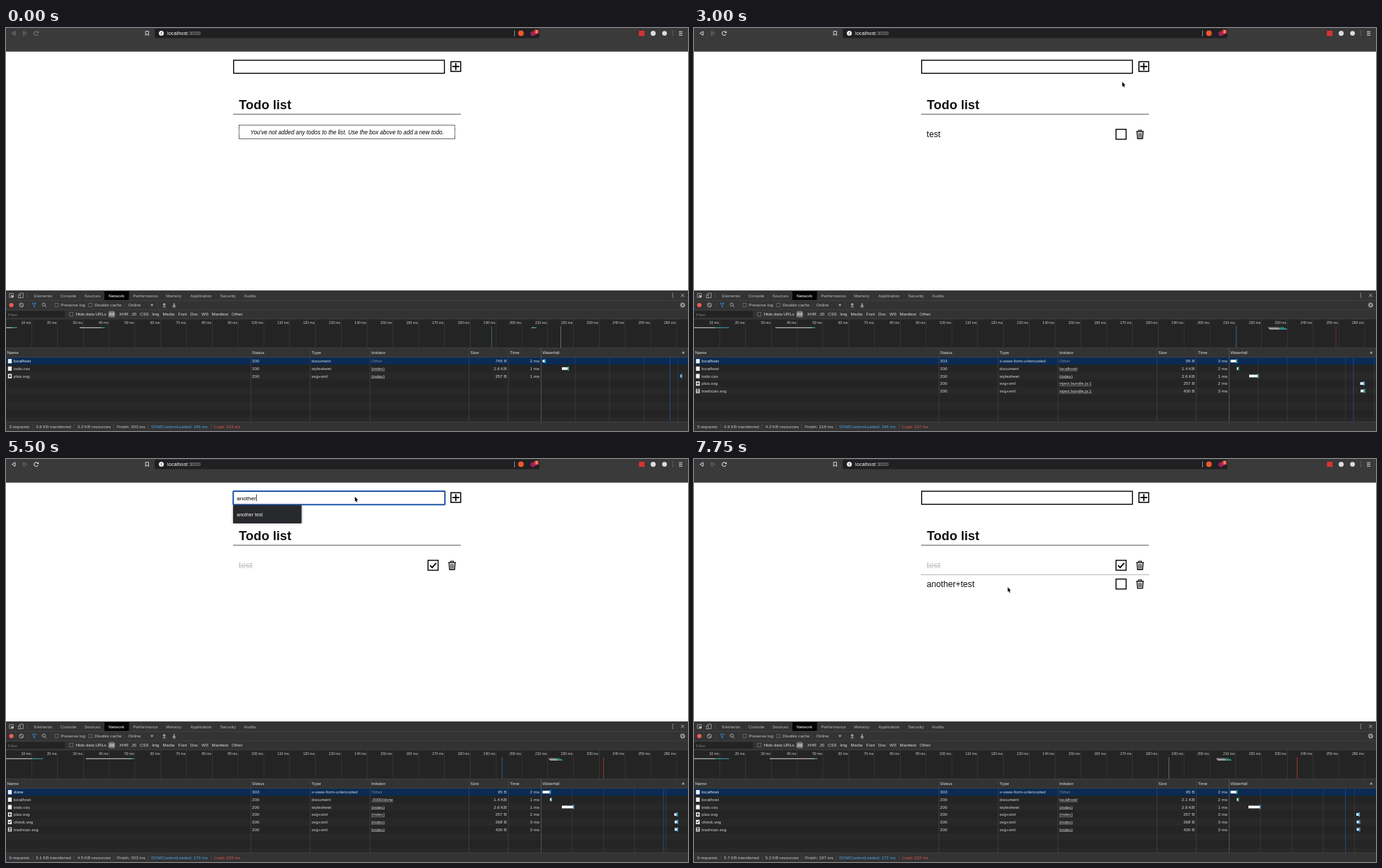
Recreate the animation shown at these times as an HTML page with a canvas. Size 973 px wide and 576 px high, loop 8 s.

```html
<!DOCTYPE html>
<html lang="en">
<head>
<meta charset="utf-8">
<title>Todo list</title>
<style>
html, body { margin: 0; width: 100%; height: 100%; overflow: hidden; background: #fff; }
canvas { display: block; width: 973px; height: 576px; }
</style>
</head>
<body>
<canvas id="stage"></canvas>
<script>
const W = 973, H = 576, LOOP = 8000;
const canvas = document.getElementById('stage');
const dpr = window.devicePixelRatio || 1;
canvas.width = W * dpr;
canvas.height = H * dpr;
const c = canvas.getContext('2d');
const GREEN = '#2fb58c', BLUE = '#38a3e0', INK = '#d6d6d6', DIM = '#8a8a8a';

// ---- drawing helpers; text is placed by the middle of its capitals ----
function text(s, x, y, color = INK, size = 6.2, style = '', align = 'left') {
  c.font = `${style} ${size}px "Liberation Sans", Arial, sans-serif`;
  c.textAlign = align;
  c.fillStyle = color;
  c.fillText(s, x, y + size * 0.36);
  return c.measureText(s).width;
}
function rect(x, y, w, h, color) { c.fillStyle = color; c.fillRect(x, y, w, h); }
function box(x, y, w, h, color, lw = 1) {
  c.strokeStyle = color; c.lineWidth = lw;
  c.strokeRect(x + lw / 2, y + lw / 2, w - lw, h - lw);
}
function round(x, y, w, h, r, color) {
  c.fillStyle = color; c.beginPath(); c.roundRect(x, y, w, h, r); c.fill();
}
function dot(x, y, r, color) {
  c.fillStyle = color; c.beginPath(); c.arc(x, y, r, 0, 7); c.fill();
}
function ring(x, y, r, color, from = 0, to = 6.3) {
  c.strokeStyle = color; c.beginPath(); c.arc(x, y, r, from, to); c.stroke();
}
function path(points, color, lw, fill) {
  c.beginPath();
  for (let i = 0; i < points.length; i += 2) c.lineTo(points[i], points[i + 1]);
  if (fill) { c.closePath(); c.fillStyle = fill; c.fill(); }
  if (color) { c.strokeStyle = color; c.lineWidth = lw || 1; c.stroke(); }
}
const vline = (x, y, h, color) => rect(x, y, 0.8, h, color);

// ---- network panel data ----
const row = (cells, start, mid, end, cap) => ({ cells: cells.split('|'), start, mid, end, cap });
const form = (name, ms, mid, cap = GREEN) =>
  row(`${name}|303|x-www-form-urlencoded|Other|95 B|${ms} ms`, 765.5, mid, mid + 1.8, cap);
const page = (from, size, ms, x, cap = GREEN) =>
  row(`localhost|200|document|${from}|${size} KB|${ms} ms`, x, x + 1.8, x + 3, cap);
const sheet = (x, mid, cap = GREEN) =>
  row('todo.css|200|stylesheet|(index)|2.6 KB|1 ms', x, mid, mid + 1.6, cap);
const image = (name, from, size, ms, x, mid, cap = BLUE) =>
  row(`${name}.svg|200|svg+xml|${from}|${size} B|${ms} ms`, x, mid, mid + 2, cap);
const waiting = name => row(`${name}.svg|(pending)||(index)|0 B|Pending`);

function pending(name, from, size, icons) {
  return {
    step: 44.9, ms: 5, grid: 51.9, load: 953,
    bars: [[0, 38, 48, 62], [136, 216, 220, 220]],
    marks: [[847, '#2f6fae']],
    stat: [`${icons.length + 3} requests`, '4.8 KB transferred', '4.5 KB resources', 'Finish: 36 ms', 'DOMContentLoaded: 172 ms'],
    rows: [form(name, 2, 775), page(from, size, 2, 776.5), sheet(795.5, 813.5, BLUE), ...icons.map(waiting)]
  };
}
function loaded(grid, load, bars, marks, stat, rows, burst) {
  return { step: 36.8, ms: 10, grid, load, bars, marks, stat, rows, burst };
}
const stats = (n, sent, res, fin, dom, load) =>
  [`${n} requests`, `${sent} KB transferred`, `${res} KB resources`, `Finish: ${fin} ms`,
   `DOMContentLoaded: ${dom} ms`, `Load: ${load} ms`];
const bundle = 'inject.bundle.js:1';

const nets = {
  empty: loaded(48.9, 947, [[0, 9, 14, 16], [105, 136, 141, 141], [750, 753, 757, 757]],
    [[692.5, '#4d7896'], [791, '#777']], stats(3, '3.6', '3.3', 203, 186, 213), [
      row('localhost|200|document|Other|745 B|2 ms', 765.5, 768.5, 770, BLUE),
      sheet(793, 801.5), image('plus', '(index)', 257, 1, 962, 962.8)]),
  adding: pending('localhost', 'localhost/', '1.4', ['plus', 'trashcan']),
  one: loaded(41.5, 940.5, [[0, 30, 38, 50], [116, 169, 173, 173]],
    [[773.5, '#2f6fae'], [915.5, '#8e2f2a']], stats(5, '4.8', '4.3', 218, 198, 237), [
      form('localhost', 3, 773.5), page('localhost/', '1.4', 2, 774.5), sheet(792, 804),
      image('plus', bundle, 257, 2, 950.5, 955), image('trashcan', bundle, 430, 3, 951, 955.5, GREEN)],
    [819, 846]),
  ticking: pending('done', ':3000/done', '1.4', ['plus', 'check', 'trashcan']),
  done: loaded(44.5, 937.5, [[0, 37, 45, 53], [114, 179, 183, 183]],
    [[707.5, '#2f6fae'], [852, '#b23a32']], stats(6, '5.1', '4.5', 203, 179, 219), [
      form('done', 2, 775.5, BLUE), page(':3000/done', '1.4', 1, 776, BLUE), sheet(793, 809, BLUE),
      image('plus', '(index)', 257, 2, 953.5, 956.5), image('check', '(index)', 268, 3, 954, 957),
      image('trashcan', '(index)', 430, 3, 954, 957)], [774, 794]),
  again: pending('localhost', 'localhost/', '2.1', ['plus', 'check', 'trashcan']),
  two: loaded(44.8, 929, [[0, 30, 39, 50], [108, 172, 176, 176]],
    [[677, '#777'], [860, '#b23a32']], stats(6, '5.7', '5.2', 197, 172, 222), [
      form('localhost', 2, 773.5), page('localhost/', '2.1', 2, 774.5), sheet(791, 807, BLUE),
      image('plus', '(index)', 257, 3, 945, 948), image('check', '(index)', 268, 3, 945.5, 948.5),
      image('trashcan', '(index)', 430, 3, 945.5, 948.5)], [745, 767])
};

// ---- what changes, and when ----
const test = { name: 'test' }, testDone = { name: 'test', done: true };
const all = ['test', 'another test'], last = ['another test'];
const idle = { focus: false, value: '', auto: false, menu: [], pick: -1, busy: false };
const steps = [
  [0, { ...idle, active: false, net: 'empty', todos: [], mouse: null }],
  [250, { active: true, mouse: [590, 170] }],
  [500, { mouse: [556, 84] }],
  [750, { mouse: [544.5, 54] }],
  [1250, { focus: true, menu: all }],
  [1750, { value: 'test', auto: true, pick: 0 }],
  [2000, { menu: [], pick: -1 }],
  [2250, { busy: true, net: 'adding' }],
  [2500, { ...idle, net: 'one', todos: [test] }],
  [2750, { mouse: [560, 59] }],
  [3000, { mouse: [611, 77] }],
  [3250, { mouse: [608, 149] }],
  [3500, { busy: true, net: 'ticking' }],
  [3750, { busy: false, net: 'done', todos: [testDone] }],
  [4000, { mouse: [570, 112] }],
  [4250, { mouse: [494.5, 54.5] }],
  [4500, { mouse: [497.8, 54] }],
  [5000, { focus: true, menu: all }],
  [5250, { value: 'ano', menu: last }],
  [5500, { value: 'another' }],
  [5750, { value: 'another test', auto: true, pick: 0 }],
  [6250, { menu: [], pick: -1 }],
  [6750, { busy: true, net: 'again' }],
  [7250, { ...idle, net: 'two', todos: [testDone, { name: 'another+test' }] }],
  [7500, { mouse: [478, 112] }],
  [7750, { mouse: [447.6, 183.2] }]
];

// ---- browser bar ----
function drawBrowser(s) {
  rect(0, 0, W, 33.6, '#3a3a3b');
  const on = s.active ? '#f0f0f0' : '#858585';
  path([13, 4.8, 8.6, 7.6, 13, 10.4, 13, 4.8], on, 0.9);
  path([25, 4.8, 29.4, 7.6, 25, 10.4, 25, 4.8], '#858585', 0.8);
  c.lineWidth = 1;
  if (s.busy) {
    path([40.2, 4.8, 45.8, 10.4], on, 1.1);
    path([45.8, 4.8, 40.2, 10.4], on, 1.1);
  } else {
    ring(43, 7.7, 2.9, on, 0.3, 5.4);
    path([46.5, 4.2, 46.5, 7, 43.7, 7], null, 0, on);
  }
  path([199.2, 4.6, 203.4, 4.6, 203.4, 10.6, 201.3, 8.8, 199.2, 10.6, 199.2, 4.6], '#e8e8e8', 0.9);
  round(212, 0.8, 549, 13.6, 2, '#202022');
  dot(221.6, 7.6, 3.5, '#f2f2f2');
  text('!', 221.6, 7.7, '#202022', 5.8, 'bold', 'center');
  const w = text('localhost', 230, 7.6, '#f5f5f5', 7.4);
  text(':3000', 230 + w, 7.6, '#a5a5a6', 7.4);
  vline(725, 3.5, 8.5, '#aaa');
  dot(734.7, 7.6, 4, '#f0562b');
  dot(751.8, 8, 3.6, '#9e1f63');
  round(753.6, 2.2, 6.4, 6.4, 2, '#e0432f');
  text('3', 756.8, 5.5, '#fff', 5, '', 'center');
  rect(903, 4, 8, 7.2, '#d8322f');
  dot(923.3, 7.6, 3.6, '#dcdcdc');
  dot(939.5, 7.6, 3.4, '#dcdcdc');
  vline(950.8, 3.5, 8.5, '#666');
  for (const y of [4.8, 7.3, 9.8]) rect(960, y, 5, 0.9, '#eee');
}

// ---- page ----
function drawTrash(x, y) {
  path([x - 5.4, y - 4, x + 5.4, y - 4], '#000', 1.4);
  path([x - 2, y - 4.4, x - 2, y - 6, x + 2, y - 6, x + 2, y - 4.4], '#000', 1.1);
  path([x - 4.3, y - 3.4, x - 3.6, y + 6, x + 3.6, y + 6, x + 4.3, y - 3.4], '#000', 1.3);
  for (const d of [-1.8, 0, 1.8]) path([x + d, y - 2, x + d, y + 4.6], '#000', 0.9);
}
function drawTodo(todo, i) {
  const y = 152 + i * 26.8;
  if (i) {
    c.setLineDash([1, 1]);
    path([324, 165.3, 649, 165.3], '#666', 1);
    c.setLineDash([]);
  }
  const w = text(todo.name, 332, y, todo.done ? '#c4c4c4' : '#111', 12.2);
  if (todo.done) rect(332, y + 0.3, w, 1, '#bbb');
  box(601.4, y - 7.9, 15.8, 15.6, '#000', 1.4);
  if (todo.done) path([605, y + 0.2, 608, y + 3.2, 613.8, y - 3.4], '#000', 1.8);
  drawTrash(636.4, y);
}
function drawPage(s) {
  rect(0, 33.6, W, 342, '#fff');
  text('Todo list', 332.3, 109.6, '#111', 18.3, 'bold');
  rect(324, 122.7, 325, 1, '#555');
  if (!s.todos.length) {
    c.setLineDash([1.1, 1.1]);
    box(332, 138.3, 309, 20.6, '#000', 1.1);
    c.setLineDash([]);
    text("You've not added any todos to the list. Use the box above to add a new todo.",
      486.7, 148.6, '#000', 8.15, 'italic', 'center');
  }
  s.todos.forEach(drawTodo);

  rect(324, 45.4, 302, 20, s.auto ? '#e8effc' : '#fff');
  if (s.focus) {
    c.strokeStyle = '#1f55a8'; c.lineWidth = 2;
    c.beginPath(); c.roundRect(324.2, 46, 302, 19.2, 0.8); c.stroke();
  } else box(324, 45.4, 302.2, 20, '#000', 1.4);
  const w = text(s.value, 329.2, 55.6, '#000', 8.1);
  if (s.focus) rect(329.4 + w, 50.6, 0.8, 9.6, '#000');
  box(634, 47.4, 15.4, 15.4, '#000', 1.5);
  path([636.7, 55.1, 646.7, 55.1], '#000', 1.8);
  path([641.7, 50.1, 641.7, 60.1], '#000', 1.8);

  const n = s.menu.length;
  if (n) {
    c.shadowColor = 'rgba(0,0,0,.4)';
    c.shadowBlur = 3 * dpr;
    rect(324, 66, 97.6, 7.8 + 18.2 * n, '#28292c');
    c.shadowBlur = 0;
    s.menu.forEach((item, i) => {
      if (i === s.pick) rect(324, 69.8 + 18.2 * i, 97.6, 18.2, '#44464a');
      text(item, 329.3, 79 + 18.2 * i, '#f2f2f2', 7);
    });
  }
}

// ---- developer tools ----
function check(x, y) { box(x, y - 2.8, 5.6, 5.6, '#777', 0.7); }
const at = (y, color, items) => items.forEach(([s, x]) => text(s, x, y, color));

function drawToolbars() {
  const icon = '#a8a8a8';
  rect(0, 375.2, W, 41, '#333');
  rect(0, 375.2, W, 0.8, '#484848');
  rect(0, 389, W, 0.7, '#484848');
  rect(0, 402.4, W, 0.7, '#444');
  rect(140.4, 376, 35, 12.7, '#000');
  at(382.3, '#b8b8b8', [['Elements', 40], ['Console', 77.5], ['Sources', 111.8], ['Performance', 181.3],
    ['Memory', 228.3], ['Application', 263], ['Security', 305.5], ['Audits', 339.6]]);
  text('Network', 146.2, 382.3, '#fff', 6.2);
  box(4.5, 379.2, 6.4, 6.2, icon, 0.8);
  path([7, 381.5, 11.4, 383.4, 9.5, 384, 8.7, 386], null, 0, '#ddd');
  box(19.5, 378.6, 5.5, 7.2, icon, 0.8);
  rect(17.3, 381.2, 3.8, 5, '#333');
  box(17.3, 381.2, 3.8, 5, icon, 0.8);
  rect(30, 378, 0.7, 8.6, '#4a4a4a');
  for (const y of [379.6, 382.2, 384.8]) dot(951.3, y, 0.75, '#bbb');
  path([963, 379.9, 967.6, 384.5], '#bbb', 0.9);
  path([967.6, 379.9, 963, 384.5], '#bbb', 0.9);

  dot(7.6, 396, 3.1, '#ee5b52');
  c.lineWidth = 1;
  ring(22, 396, 2.9, icon);
  path([20, 394, 24, 398], icon, 1);
  path([37.2, 393.3, 43, 393.3, 40.8, 396.2, 40.8, 399.2, 39.4, 398, 39.4, 396.2, 37.2, 393.3], '#3b82c9', 0.9);
  c.lineWidth = 1;
  ring(53.8, 395.3, 2.2, icon);
  path([55.4, 397, 57.8, 399.4], icon, 1);
  for (const x of [32, 63.5, 168.5, 216]) rect(x, 392.4, 0.6, 7.6, '#484848');
  check(69.4, 396);
  check(117.6, 396);
  at(396, '#c4c4c4', [['Preserve log', 78.3], ['Disable cache', 126.2], ['Online', 174.3]]);
  path([206.2, 394.8, 210.2, 394.8, 208.2, 398], null, 0, '#aaa');
  for (const [x, d] of [[225.7, -1], [239.8, 1]]) {
    path([x - 2.6, 396 + d * 0.2, x + 2.6, 396 + d * 0.2, x, 396 + d * 3], null, 0, icon);
    rect(x - 0.7, 393.2, 1.4, 5.4, icon);
    rect(x - 2.6, 398.6, 5.2, 0.7, icon);
  }
  c.setLineDash([1.2, 1]);
  c.lineWidth = 1.3;
  ring(965.3, 396, 3.2, icon);
  c.setLineDash([]);
  ring(965.3, 396, 2, icon);

  rect(0, 404.4, 84, 9.6, '#232323');
  text('Filter', 2.8, 409.3, '#777');
  check(90.4, 409);
  text('Hide data URLs', 99.4, 409, '#ddd');
  round(146, 404.5, 9.6, 9, 2.5, '#777');
  text('All', 150.8, 409, '#fff', 6.2, '', 'center');
  at(409, '#ddd', [['XHR', 161.6], ['JS', 179], ['CSS', 191], ['Img', 208.2], ['Media', 223.6],
    ['Font', 245.7], ['Doc', 263], ['WS', 279], ['Manifest', 293.6], ['Other', 322]]);
}

function drawOverview(net) {
  rect(0, 416, W, 41.2, '#242424');
  rect(0, 415.6, W, 0.7, '#444');
  for (let i = 1; i * net.step < W + 30; i++) {
    vline(i * net.step - 0.4, 416, 41, '#393939');
    text(`${i * net.ms} ms`, i * net.step - 1.3, 420.7, '#ccc', 5.05, '', 'right');
  }
  for (const [a, b, d, e] of net.bars) {
    rect(a, 427.8, b - a, 1.1, '#c9c9c9');
    rect(b, 427.8, d - b, 1.1, GREEN);
    rect(d, 427.8, e - d, 1.1, '#3796a8');
  }
  if (net.burst) {
    const [a, b] = net.burst;
    [0, 1, 2].forEach(i => {
      rect(a + i, 427.7 + i * 1.2, (b - a) * 0.55, 0.9, '#b8b8b8');
      rect(a + i + (b - a) * 0.55, 427.7 + i * 1.2, (b - a) * 0.45 - 2 + (i ? 0 : -2), 0.9, i === 1 ? '#3796a8' : GREEN);
    });
  }
  for (const [x, color] of net.marks) vline(x, 426, 31, color);
}

function drawFileIcon(name, isPending, y) {
  rect(2.8, y - 3, 5.4, 6.2, '#f2f2f2');
  if (isPending) path([3.4, y + 2.5, 5, y, 6.4, y + 1.2, 7.6, y + 2.5], null, 0, '#6d9cba');
  else if (name === 'plus.svg') {
    path([3.7, y, 7.3, y], '#111', 1);
    path([5.5, y - 1.8, 5.5, y + 1.8], '#111', 1);
  } else if (name === 'check.svg') path([3.8, y, 5, y + 1.4, 7.2, y - 1.6], '#111', 1);
  else if (name === 'trashcan.svg') {
    box(3.9, y - 1.5, 3.2, 3.8, '#333', 0.6);
    rect(3.5, y - 2.3, 4, 0.7, '#333');
    rect(5.2, y - 1.4, 0.6, 3.4, '#333');
  }
}

function drawTable(net) {
  const rowH = 10.66, top = 470.8;
  rect(0, 457, W, 13.8, '#333');
  rect(0, 456.8, W, 0.7, '#484848');
  rect(0, top, W, 563 - top, '#242424');
  for (let i = 0; i < 9; i++) {
    const y = top + i * rowH;
    rect(0, y, W, Math.min(rowH, 563 - y), i ? (i % 2 ? '#242424' : '#282828') : '#0b2b54');
  }
  for (let x = 763.3 + net.grid; x < W; x += net.grid) vline(x - 0.4, top, 563 - top, 'rgba(130,130,130,.24)');
  for (const x of [348.8, 433.5, 518.8, 660, 716.2]) vline(x, 457, 106, '#414141');
  vline(763, 457, 106, '#58606c');
  vline(net.load, top, 563 - top, '#28508c');
  at(463.6, '#ddd', [['Name', 1.4], ['Status', 351], ['Type', 436], ['Initiator', 521.3],
    ['Size', 662.6], ['Time', 719], ['Waterfall', 765.4]]);
  path([964.2, 465.2, 968.2, 465.2, 966.2, 461.8], null, 0, '#aaa');
  rect(0, 470.4, W, 0.6, '#484848');

  net.rows.forEach((r, i) => {
    const y = 476.1 + i * rowH;
    const [name, status, type, from, size, time] = r.cells;
    const isPending = time === 'Pending';
    drawFileIcon(name, isPending, y);
    text(name, 11, y, i ? INK : '#eee');
    text(status, 351, y, isPending ? DIM : INK);
    text(type, 436, y);
    const link = from !== 'Other';
    const w = text(from, 521.3, y, link ? INK : '#7d8796');
    if (link) rect(521.3, y + 3, w, 0.5, '#bbb');
    text(size, 714.3, y, INK, 6.2, '', 'right');
    text(time, 761, y, isPending ? DIM : INK, 6.2, '', 'right');
    if (!isPending) {
      rect(r.start, y - 1.9, r.mid - r.start, 3.8, '#fff');
      rect(r.mid, y - 2.9, r.end - r.mid, 5.8, r.cap);
    }
  });
}

function drawStatus(net) {
  rect(0, 563, W, 13, '#333');
  rect(0, 562.7, W, 0.7, '#484848');
  const xs = [4.4, 42.5, 101.8, 158.3, net.stat.length < 6 ? 204 : 207.3, 297];
  net.stat.forEach((s, i) => {
    if (i) vline(xs[i] - 5, 566, 7.6, '#4a4a4a');
    text(s, xs[i], 570, i < 4 ? '#c8c8c8' : i < 5 ? '#45a5e6' : '#e0574a');
  });
}

function drawMouse([x, y]) {
  const shape = [0, 0, 0, 6.6, 1.4, 5.4, 2.4, 7.8, 3.5, 7.3, 2.5, 5, 4.4, 4.8, 0, 0];
  path(shape.map((v, i) => v + (i % 2 ? y : x)), '#fff', 1, '#000');
  path(shape.map((v, i) => v + (i % 2 ? y : x)), null, 0, '#000');
}

function frame() {
  const t = performance.now() % LOOP;
  const s = Object.assign({}, ...steps.filter(([start]) => start <= t).map(([, change]) => change));
  const net = nets[s.net];
  c.setTransform(dpr, 0, 0, dpr, 0, 0);
  drawPage(s);
  drawBrowser(s);
  drawToolbars();
  drawOverview(net);
  drawTable(net);
  drawStatus(net);
  if (s.mouse) drawMouse(s.mouse);
  requestAnimationFrame(frame);
}
frame();
</script>
</body>
</html>
```
